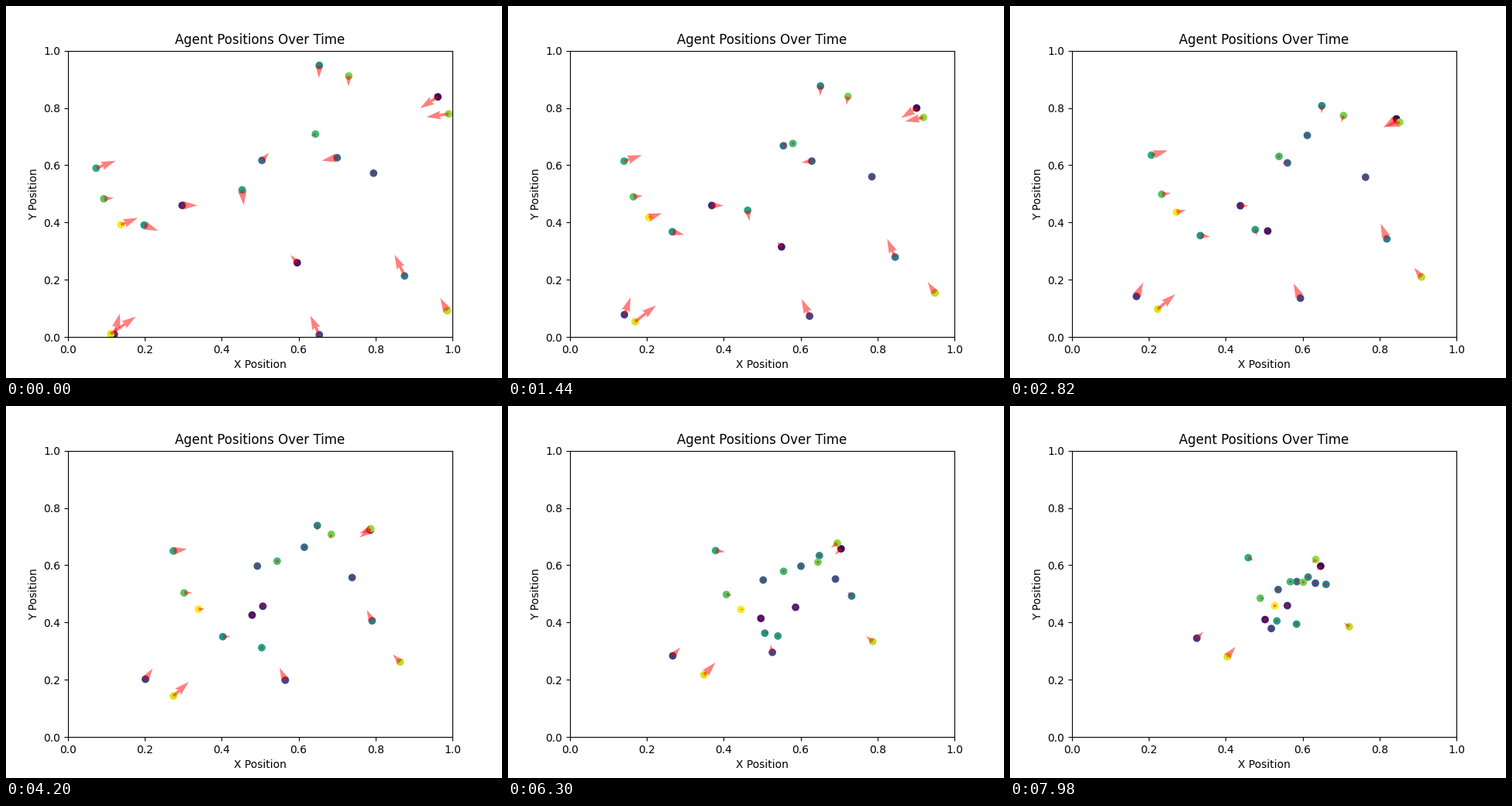
Write a matplotlib script that moves like this. It is 640 px wide and 480 px high and loops after 8000 ms.

```python
import numpy as np
import matplotlib.pyplot as plt
from matplotlib.animation import FuncAnimation

TICK_MS = 20
TICKS = 400
TICKS_PER_STEP = 3
SPEED = 0.003

start = np.array([
    (0.9622, 0.8386), (0.5963, 0.2596), (0.2969, 0.4598), (0.1205, 0.0093),
    (0.6537, 0.0080), (0.7949, 0.5721), (0.7001, 0.6262), (0.5045, 0.6168),
    (0.8755, 0.2136), (0.6537, 0.9485), (0.1981, 0.3908), (0.4531, 0.5139),
    (0.0731, 0.5897), (0.6437, 0.7087), (0.0932, 0.4828), (0.7303, 0.9117),
    (0.9904, 0.7791), (0.9864, 0.0919), (0.1114, 0.0112), (0.1376, 0.3922),
])

# Each agent heads for the point midway between two others
leaders = np.array([
    (2, 6), (15, 18), (4, 15), (11, 12), (6, 19),
    (8, 15), (7, 14), (13, 15), (7, 15), (2, 16),
    (17, 19), (8, 18), (7, 9), (0, 14), (7, 10),
    (5, 13), (14, 15), (0, 4), (8, 13), (6, 11),
])


def pull(pos):
    """Vector from every agent to the midpoint of its two leaders."""
    return pos[leaders].mean(axis=1) - pos


def advance(pos):
    """Move at constant speed towards the midpoint without overshooting."""
    aim = pull(pos)
    dist = np.linalg.norm(aim, axis=1, keepdims=True)
    return pos + aim * np.minimum(1, SPEED / np.maximum(dist, 1e-9))


track = [start]
for _ in range((TICKS - 1) // TICKS_PER_STEP):
    track.append(advance(track[-1]))

fig, ax = plt.subplots(figsize=(6.4, 4.8), dpi=100)
dots = ax.scatter(*start.T, c=np.arange(len(start)), cmap="viridis")
arrows = ax.quiver(*start.T, *pull(start).T, color="red", alpha=0.5, scale=10)
ax.set(xlim=(0, 1), ylim=(0, 1), xlabel="X Position", ylabel="Y Position",
       title="Agent Positions Over Time")


def update(tick):
    pos = track[tick // TICKS_PER_STEP]
    dots.set_offsets(pos)
    arrows.set_offsets(pos)
    arrows.set_UVC(*pull(pos).T)
    return dots, arrows


anim = FuncAnimation(fig, update, frames=TICKS, interval=TICK_MS,
                     init_func=lambda: update(0), repeat=True, repeat_delay=0)
plt.show()
```
